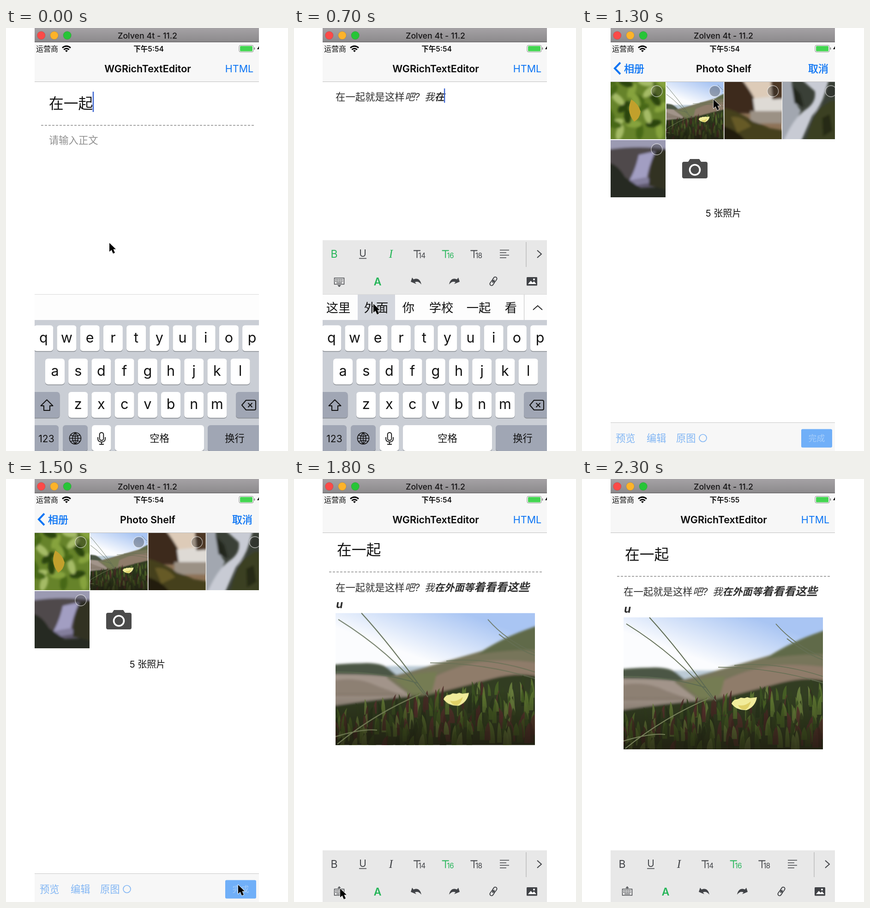
Animation, 611 px wide and 917 px high, one loop 2400 ms. Source, as an HTML page:

```html
<!DOCTYPE html>
<html lang="zh-CN">
<head>
<meta charset="utf-8">
<title>Rich text editor</title>
<style>
html, body { margin: 0; width: 100%; height: 100%; overflow: hidden; background: #fff }
svg { display: block }
text { font-family: Inter, "Noto Sans CJK SC", "Noto Sans CJK", sans-serif; white-space: pre }
</style>
</head>
<body>
<svg id="stage" width="100%" height="100%" viewBox="0 0 611 917">
  <defs id="defs"></defs>
  <g id="scene" clip-path="url(#phone)"></g>
</svg>
<script>
const STEP = 100, STEPS = 24;
const BLUE = '#0b74f4', GREEN = '#25b558', INK = '#414347', CARET = '#3f68d2';

// Drawing helpers
const rect = (x, y, w, h, fill, more = '') =>
  `<rect x="${x}" y="${y}" width="${w}" height="${h}" fill="${fill}" ${more}/>`;
const circle = (x, y, r, fill, more = '') => `<circle cx="${x}" cy="${y}" r="${r}" fill="${fill}" ${more}/>`;
const shape = (d, fill, more = '') => `<path d="${d}" fill="${fill}" ${more}/>`;
const line = (d, color, width = 2, more = '') =>
  `<path d="${d}" fill="none" stroke="${color}" stroke-width="${width}" ${more}/>`;
const text = (x, y, size, str, fill = '#111', more = '') =>
  `<text x="${x}" y="${y}" font-size="${size}" fill="${fill}" ${more}>${str}</text>`;
const mid = (x, y, size, str, fill, more = '') => text(x, y, size, str, fill, 'text-anchor="middle" ' + more);
const at = (x, y, body, more = '') => `<g transform="translate(${x} ${y}) ${more}">${body}</g>`;
const blur = (level, body) => `<g filter="url(#${level})">${body}</g>`;
const picture = (id, x, y, w, h, box) =>
  `<svg x="${x}" y="${y}" width="${w}" height="${h}" viewBox="0 0 ${box}" preserveAspectRatio="xMidYMid slice"><use href="#${id}"/></svg>`;
const gradient = (id, a, b, more = 'x2="0" y2="1"') =>
  `<linearGradient id="${id}" ${more}><stop stop-color="${a}"/><stop offset="1" stop-color="${b}"/></linearGradient>`;
const blurDef = (id, amount) =>
  `<filter id="${id}" x="-10%" y="-10%" width="120%" height="120%"><feGaussianBlur stdDeviation="${amount}"/></filter>`;

// Photographs as soft, simplified scenes
function beach() {
  let seed = 7;
  const rnd = () => (seed = seed * 16807 % 2147483647) / 2147483647;
  const tones = ['#4a6426', '#5f7833', '#3b5122', '#6d833f', '#4b2a27', '#5d3230', '#29351c', '#333f20'];
  const land = rect(110, 115, 120, 30, '#bccbd6') +
    shape('M-20 128L110 134 200 160 280 170V230H-20z', '#a2948a') +
    shape('M-20 150q60-16 110 8l60 22H-20z', '#8d8073') +
    shape('M-20 114q40-5 74-5q46-3 64 14l22 18q-70-10-160-8z', '#4c5645') +
    shape('M110 140Q230 108 318 82Q370 50 452 22V200H190z', '#77745a') +
    shape('M190 150Q270 108 330 104T452 110V170H200z', '#8f7c6b') +
    shape('M308 90Q370 46 452 24V80Q376 78 308 90z', '#606a49') +
    shape('M130 146q50-20 90-18l-10 40-40 12z', '#757c53') +
    shape('M-20 204Q100 184 200 178Q280 158 340 142T452 140V306H-20z', '#323c20');
  let blades = '';
  for (let i = 0; i < 240; i++) {
    const depth = i / 240, x = rnd() * 450 - 9, w = 2.5 + depth * 3 + rnd() * 2, h = 28 + rnd() * 22;
    const y = 192 + depth * 84 - x * .15 * (1 - depth * .6), lean = rnd() * 14 - 7;
    blades += shape(`M${x - w} ${y + h}Q${x - w} ${y + 8} ${x + lean} ${y}Q${x + w} ${y + 10} ${x + w} ${y + h}z`,
      tones[rnd() * tones.length | 0], 'opacity=".85"');
  }
  const grass = line('M6 14Q120 85 192 176M56 0Q120 70 200 182M0 128Q90 126 178 152', '#5d6a52', 1.9) +
    line('M4 284Q90 215 184 176M0 268q60-18 90-14', '#77805a', 2) +
    line('M432 142Q320 108 205 108M432 128Q330 95 240 104M330 14Q370 60 432 86M354 46Q400 82 432 92', '#667055', 1.6);
  return rect(0, 0, 432, 286, 'url(#sky)') + rect(0, 210, 432, 76, '#323c20') +
    blur('soft', land) + blur('slight', blades) + rect(0, 170, 432, 116, 'url(#shade)') + blur('slight', grass) +
    shape('M234 187q4-10 14-10l6-3 8 1 6-2 7 2 14-2q-3 20-22 28q-22 1-33-14z', '#f1ec9b') +
    shape('M248 190q14 4 28-8q-4 14-12 18q-12 0-16-10z', '#dfd067');
}
const small = (base, body) => rect(0, 0, 124, 124, base) + blur('soft', body);
function leaves() {
  let s = '';
  for (let i = 0; i < 26; i++) {
    const x = i * 47 % 124, y = i * 71 % 124;
    s += `<ellipse rx="17" ry="8" fill="${['#476817', '#86a33c', '#2b4411', '#a5bb66'][i % 4]}" transform="translate(${x} ${y}) rotate(${i * 53})"/>`;
  }
  return small('#66832a', s) + shape('M50 38q16 10 20 26q-2 16-14 22q-10-12-11-26q0-12 5-22z', '#c2a02c');
}
const falls = () => small('#8d7257', rect(30, -10, 84, 52, '#ddcbb8') +
  shape('M-10-10h44q18 22 30 44l6 34H-10z', '#3d2a1c') + shape('M62 36l72-8v38H66z', '#dedad5') +
  shape('M100-10h34v46l-30 2z', '#4d3725') + rect(56, 63, 78, 27, '#9b9185') +
  shape('M-10 54q44 10 72 32q20 6 36 14l36 6v28H-10z', '#45401d') + shape('M14 76q24-4 44 20l-30 14z', '#665a26') +
  shape('M-10 94q40 8 60 40H-10z', '#241d0f'));
const stream = () => small('#3a4037', shape('M-10-10h30q0 48 20 72L8 134H-10z', '#a2a7b0') +
  shape('M36-10h66l-10 34q-8 28-28 50L38 134H0q22-54 50-74q24-16 20-40z', '#c8cbd4') +
  shape('M76 60l30-20 28 8v86H50q10-44 26-74z', '#3b4020') + shape('M20 6l18 20 8 28-20-8z', '#20251f') +
  shape('M86 78l16-8 6 36-20 12z', '#252913'));
const dusk = () => small('#5c566a', shape('M-10-10h144v34q-60-8-144 4z', '#9b9ab2') +
  shape('M-10 22q70-12 144-2v72L82 88H48L-10 62z', '#4f484b') +
  shape('M66 32l36-8q-16 34-20 68l-44 8q20-30 28-68z', '#a29ec2') + shape('M40 88l44-8 14 12-48 8z', '#837e9c') +
  shape('M-10 46q30 4 46 34l34 24 64-4v34H-10z', '#282c20') + shape('M104 24l30-4v90l-46-12q0-44 16-74z', '#303223'));

document.getElementById('defs').innerHTML =
  `<clipPath id="phone">${rect(62, 0, 486, 917, '#000')}</clipPath>` +
  gradient('sky', '#a9c5f3', '#fbfcfe', 'x1=".65" y1="0" x2=".45" y2=".36"') +
  gradient('shade', '#1a1c0c00', '#1a160cb0') + gradient('bar', '#a5a2a5', '#8b898b') +
  blurDef('soft', 2.6) + blurDef('slight', .7) +
  Object.entries({ beach, leaves, falls, stream, dusk }).map(([id, f]) => `<g id="${id}">${f()}</g>`).join('');

// Window, status and navigation bars
function header(step, gallery) {
  const lights = ['#fc4a48', '#fdb32a', '#27c537'].map((c, i) => circle(76.3 + i * 28.2, 16, 8.7, c, 'stroke="#0002"')).join('');
  const link = `stroke="${BLUE}" stroke-width=".5"`;
  return rect(62, 31, 486, 85, '#f7f7f7') + rect(62, 116, 486, 1, '#bebebe') +
    rect(62, 0, 486, 31, 'url(#bar)') + rect(62, 29.5, 486, 1.5, '#6c6a6c') + lights +
    mid(306.5, 22.5, 17.8, 'Zolven 4t - 11.2', '#151415', 'font-weight="500"') +
    text(65, 51, 16, '运营商', '#111', 'font-weight="500"') +
    line('M122 43q9-7.5 18 0M125.3 46.8q5.7-4.6 11.4 0', '#000', 2.9) + shape('M128 49q3-2 6 0l-3 3.2z', '#000') +
    mid(309, 50.5, 15.6, step < 22 ? '下午5:54' : '下午5:55', '#111', 'font-weight="600"') +
    rect(505, 37.5, 31, 14.5, '#fff', 'rx="3" stroke="#888"') + rect(507, 39, 27, 11.5, '#43d551', 'rx="1.5"') +
    rect(537.3, 42, 2, 5, '#888', 'rx="1"') + shape('M549 38l-5 8h5z', '#000') +
    mid(307, 95.5, 21.5, gallery ? 'Photo Shelf' : 'WGRichTextEditor', '#050505', 'font-weight="600"') +
    (gallery
      ? line('M83 75L71 87.5 83 100', BLUE, 4) + text(91, 95.5, 22, '相册', BLUE, link) +
        text(490, 95.5, 22, '取消', BLUE, link)
      : mid(505.5, 95.5, 21.5, 'HTML', BLUE));
}

// Text being written: [first character, x, size, style]
const BODY = '在一起就是这样吧? 我在外面等着看看这些';
const ITALIC = 'font-style="italic"', HEAVY = ITALIC + ' font-weight="700"';
const RUNS = [[0, 90, 21.4, ''], [7, 240, 21.4, ITALIC], [10, 283, 21.4, ITALIC], [11, 304.5, 21.4, HEAVY], [15, 390, 24, HEAVY]];
const TYPED = [0, 0, 3, 4, 7, 9, 11, 12, 14, 15, 18, 20];

function page(step) {
  const count = TYPED[step] ?? 20;
  const scroll = step > 1 && step < 11 ? 95 : step > 10 && step < 19 ? 9.5 : 0;
  let s = text(93, 174.5, 31.8, '在一起') +
    line('M76 211H538', '#8b8b8b', 1.3, 'stroke-dasharray="5 3"');
  if (!count) s += text(93, 251, 21.3, '请输入正文', '#8f8f8f');
  RUNS.forEach(([from, x, size, style], i) => {
    const part = BODY.slice(from, Math.min(count, RUNS[i + 1]?.[0] ?? 20));
    if (part) s += text(x, 252, size, part, '#2e2e2e', style);
  });
  if (step == 11) s += rect(90, 258.5, 15, 38, '#e1e7f6');
  if (step > 10) s += text(91, 289.5, 24, 'u', '#2e2e2e', HEAVY);
  if (step > 15) s += picture('beach', 90, 300, 432, 286, '432 286');
  if (step == 0) s += rect(187.7, 138, 2.6, 44, CARET);
  else if (step < 11) {
    const [from, x, size] = RUNS.filter(r => r[0] < count).pop() || RUNS[0];
    s += rect(x + (count - from) * size - 1, 226, 2.4, 31, CARET);
  } else if (step == 11) s += rect(103.5, 258.5, 2.5, 38, CARET);
  else if (step == 19 || step == 20) s += rect(519.5, 300, 3, 286, CARET);
  return at(0, -scroll, s);
}

function toolbar(step, top, keys) {
  const italic = step > 4 && step < 12, bold = step > 6 && step < 12, size = step == 10 || step == 11 ? 18 : 16;
  const tone = on => on ? GREEN : INK;
  const sizes = [14, 16, 18].map((n, i) => {
    const x = 259 + i * 61.7, c = tone(n == size);
    return line(`M${x} 22.5h15M${x + 7.5} 22v16.5`, c, 1.8) + text(x + 10.5, 38.5, 15.5, n, c, 'letter-spacing="-.6"');
  }).join('');
  const arrow = shape('M-11 1l3-9 3 4c8-4 15 0 17 11c-5-6-9-7-14-5l3 4z', INK);
  const board = rect(-10.5, -7, 21, 13.5, 'none', `stroke="${INK}" stroke-width="1.4"`) +
    line('M-8-3.5H8M-8 0H8', INK, 2, 'stroke-dasharray="2.2 1.5"') + line('M-6 3.5H6', INK, 1.5);
  return at(0, top,
    rect(62, 0, 486, 117, '#e8e8e8') +
    mid(87, 38, 23, 'B', tone(bold)) +
    mid(149, 36, 21, 'U', INK) + line('M141 39.5h16', INK, 1.6) +
    mid(210, 38, 25, 'I', tone(italic), 'style="font-family:Liberation Serif,serif" font-style="italic"') + sizes +
    line('M446 21.5h20M446 27h14M446 32.5h20M446 38h14', INK, 1.7) +
    line('M503 4V58', '#b5b5b5', 1.3) + line('M527 22l9 8-9 8', INK) +
    at(98, 89, at(0, keys && step < 12 ? 0 : 2, board) +
      (keys && step < 12 ? shape('M-4 8.5h8l-4 4z', INK) : line('M0-5v-5M-3-7l3-3 3 3', INK, 1.4))) +
    mid(181, 97.5, 23, 'A', GREEN, 'font-weight="600"') +
    at(264, 89, arrow) + at(348, 89, arrow, 'scale(-1 1)') +
    at(432, 89, [-4.5, 4.5].map(y => rect(-3.6, y - 6, 7.2, 12, 'none', `rx="3.4" stroke="${INK}" stroke-width="1.9"`)).join('') +
      line('M0-4V4', INK, 1.5), 'rotate(35)') +
    rect(504, 80, 23, 18.5, INK, 'rx="1.5"') + shape('M507 95l6-7 4 4 3-3 5 6z', '#fff') + circle(520, 85, 2, '#fff'));
}

// Words offered above the keys
function candidates(step) {
  let s = rect(62, 577, 486, 56, '#fdfdfd') + rect(62, 577, 486, 1, '#d9d9d9');
  const row = (words, xs, size) => words.forEach((w, i) => s += mid(xs[i], 615.5, size, w));
  if (step == 11) row(['u', 'u', 'u'], [85, 144, 203], 25);
  else if (step > 11) row(['，', '。', '?', '!', '、', '……'], [84, 144, 196, 255, 321, 384], 24);
  else if (step > 1) {
    if (step == 7) s += rect(138, 578, 81, 55, '#d4d7de');
    row(['这里', '外面', '你', '学校', '一起', '看'], [96, 178, 248, 319, 400, 470], 26.3);
    s += rect(498, 578, 1.3, 55, '#cfcfcf') + line('M518 611l10-9 10 9', '#222', 1.8);
  }
  return s;
}

function keyboard(step) {
  const key = (x, y, w, label = '', dark = 0, size = 21.3, dy = 36) =>
    rect(x, y + 1.5, w, 56, '#868a90', 'rx="6"') + rect(x, y, w, 56, dark ? '#a0a6b4' : '#fff', 'rx="6"') +
    mid(x + w / 2, y + dy, size, label);
  const letters = (str, x, y) => [...str].map((c, i) => key(x + i * 50.2, y, 42, c, 0, 30.5, 37)).join('');
  const composing = step == 11;
  return candidates(step) + rect(62, 633, 486, 284, '#caced5') +
    letters('qwertyuiop', 60.3, 644.5) + letters('asdfghjkl', 85, 716.7) + letters('zxcvbnm', 135.2, 789) +
    key(56, 789, 60.5, '', 1) + key(498, 789, 60, '', 1) +
    key(58, 861, 56, '', 1) + mid(87.5, 897.5, 21, '123') + key(123, 861, 54, '', 1) + key(186, 861, 41.5) +
    key(236, 861, 193, composing ? '选定' : '空格') + key(437, 861, 117, composing ? '确认' : '换行', 1) +
    line('M88.5 806l13 13h-6.5v10h-13v-10h-6.5z', '#111', 2, 'stroke-linejoin="round"') +
    line('M511 817.5l9-10.5h18q3 0 3 3v15q0 3-3 3h-18zM524.5 813l9 9m0-9l-9 9', '#111', 2, 'stroke-linejoin="round"') +
    at(150, 889.5, circle(0, 0, 12.5, 'none', 'stroke="#111" stroke-width="1.6"') +
      line('M-12.5 0h25M0-12.5v25M-10-7q10 5 20 0M-10 7q10-5 20 0M0-12.5q-12 12.5 0 25q12-12.5 0-25', '#111', 1.5)) +
    at(207, 889, rect(-4.3, -12, 8.6, 17, 'none', 'rx="4.3" stroke="#111" stroke-width="1.9"') +
      line('M-8-2v3q0 7.5 8 7.5q8 0 8-7.5v-3M0 8.5v5M-5 13.5h10', '#111', 1.8));
}

function gallery() {
  const pale = '#82b6f4';
  const thumbs = ['leaves', 'beach', 'falls', 'stream', 'dusk'].map((id, i) => {
    const x = 57 + i % 4 * 125.8, y = i < 4 ? 117 : 243;
    return picture(id, x, y, 124, 124, id == 'beach' ? '432 286' : '124 124') +
      circle(x + 105, y + 20, 12, '#2225', 'stroke="#fff9" stroke-width="1.3"');
  }).join('');
  return thumbs +
    shape('M221 290h9l4-6h20l4 6h10q4 0 4 4v28q0 4-4 4h-47q-4 0-4-4v-28q0-4 4-4z', '#4b4b4b') +
    circle(244.5, 307.5, 11, 'none', 'stroke="#fff" stroke-width="3.6"') +
    mid(306.5, 409, 20, '5 张照片') +
    rect(62, 855, 486, 62, '#f7f7f7') + rect(62, 855, 486, 1, '#c8c8c8') +
    ['预览', '编辑', '原图'].map((w, i) => text([73, 140, 204][i], 897, 21.3, w, pale)).join('') +
    circle(262, 889, 8, 'none', `stroke="${pale}" stroke-width="1.7"`) +
    rect(475, 869.5, 67, 40, '#70aff8', 'rx="3"') + mid(508.5, 896, 18, '完成', '#a5cdfa');
}

// Pointer stops: [step, x, y]
const PATH = [[0, 224, 466], [7, 172, 598], [11, 529, 561], [13, 285, 155], [15, 503, 880], [16, 496, 858], [18, 100, 888], [20, 103, 545]];
function pointer(step) {
  if (step > 20) return '';
  const i = Math.max(1, PATH.findIndex(p => p[0] >= step)), [a, ax, ay] = PATH[i - 1], [b, bx, by] = PATH[i];
  const u = (step - a) / (b - a), k = u * u * (3 - 2 * u);
  return at(ax + (bx - ax) * k, ay + (by - ay) * k,
    shape('M0 0V19l4.5-4 3.5 8 4-1.7-3.5-7.8H14z', '#000', 'stroke="#fff" stroke-width="1.5" paint-order="stroke"'));
}

function scene(step) {
  const picking = step > 11 && step < 16;
  const keys = step < 12 || step == 19 || step == 20;
  let s = rect(62, 0, 486, 917, '#fff');
  if (picking) s += gallery();
  else {
    s += page(step);
    if (step) s += toolbar(step, keys ? 460 : 805, keys);
    if (keys) s += keyboard(step);
  }
  return s + header(step, picking) + pointer(step);
}

const target = document.getElementById('scene'), start = performance.now();
let shown = -1;
function tick() {
  const step = Math.floor((performance.now() - start) / STEP) % STEPS;
  if (step != shown) target.innerHTML = scene(shown = step);
  requestAnimationFrame(tick);
}
tick();
</script>
</body>
</html>
```
